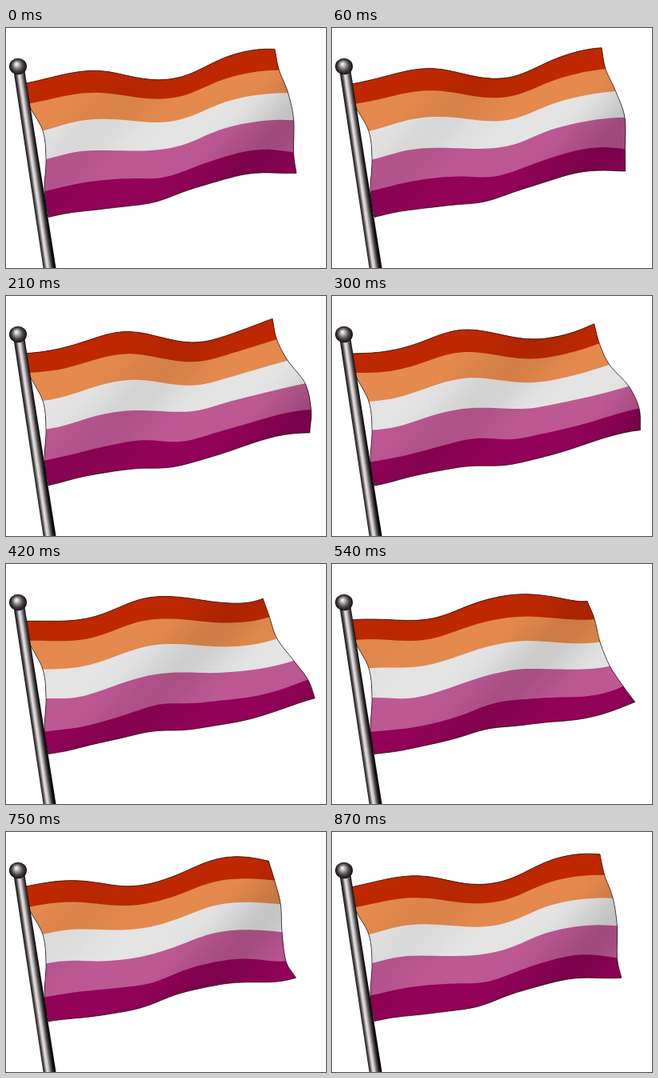
Write an HTML page with a canvas that moves like this. It is 400x300 px and loops after 900 ms.

```html
<!DOCTYPE html>
<html lang="en">
<head>
<meta charset="utf-8">
<title>Waving flag</title>
<style>
  html, body { margin: 0; width: 100%; height: 100%; overflow: hidden; background: #fff; }
  canvas { display: block; }
</style>
</head>
<body>
<canvas id="stage" width="400" height="300"></canvas>
<script>
const ctx = document.getElementById('stage').getContext('2d');
const LOOP = 900, STEP = 30;
const COLORS = ['#d52d00', '#ff9a56', '#ffffff', '#d362a4', '#a30262'];

// Seams from top to bottom. At six stations along x: mean height, swing,
// and the time of the wave crest. end: mean x, swing, time of the furthest reach.
const SEAMS = [
  { left: 25, mean: [70, 61.5, 55, 50.5, 41, 35.5], amp: [2, 9, 12.5, 11.5, 10, 11],
    crest: [-150, 75, 300, 520, 775, 985], end: [328, 9, 70] },
  { left: 28, mean: [95, 88, 81, 76.5, 67, 60], amp: [1, 8, 10.5, 9.5, 8, 9],
    crest: [-150, 80, 300, 520, 780, 985], end: [335, 7, 60] },
  { left: 46, mean: [130, 121.5, 112.5, 106.5, 96.5, 88], amp: [2, 7.5, 9, 8.5, 8, 9.5],
    crest: [-100, 75, 285, 525, 790, 1010], end: [345, 10, 100] },
  { left: 50, mean: [166, 159.5, 149.5, 140.5, 129, 119], amp: [2, 8, 8, 7, 6.5, 10],
    crest: [-50, 105, 300, 530, 820, 1070], end: [358, 16, 210] },
  { left: 48, mean: [207, 198, 187, 176.5, 164, 151], amp: [3, 6.5, 6, 6, 5.5, 10.5],
    crest: [50, 90, 250, 590, 840, 1190], end: [367, 17, 290] },
  { left: 53, mean: [237, 228.5, 218, 206, 193, 175], amp: [.5, 3.5, 4.5, 5.5, 6, 8],
    crest: [50, 230, 370, 690, 870, 1260], end: [374, 13, 370] }
];

const wave = ms => Math.cos(ms / LOOP * 2 * Math.PI);

// Catmull-Rom through evenly spaced values
function spline(v, u) {
  const last = v.length - 1;
  const i = Math.min(Math.floor(u), last - 1), f = u - i;
  const b = v[i], c = v[i + 1];
  const a = i > 0 ? v[i - 1] : 2 * b - c;
  const d = i + 2 <= last ? v[i + 2] : 2 * c - b;
  return b + f / 2 * (c - a + f * (2 * a - 5 * b + 4 * c - d + f * (3 * (b - c) + d - a)));
}

function sample(span, point) {
  const n = span * 10;
  return Array.from({ length: n + 1 }, (_, i) => point(i / 10));
}

function seamPoints(s, t) {
  const [mid, swing, peak] = s.end;
  const xs = [s.left, 100, 160, 220, 280, mid + swing * wave(t - peak)];
  return sample(5, u => [
    spline(xs, u),
    spline(s.mean, u) - spline(s.amp, u) * wave(t - spline(s.crest, u))
  ]);
}

function smooth(pts) {
  const xs = pts.map(p => p[0]), ys = pts.map(p => p[1]);
  return sample(pts.length - 1, u => [spline(xs, u), spline(ys, u)]);
}

function shape(pts) {
  const path = new Path2D();
  pts.forEach(([x, y]) => path.lineTo(x, y));
  path.closePath();
  return path;
}

// Slanted folds that travel with the wave and deepen to the lower right
function foldShade(t) {
  const g = ctx.createLinearGradient(0, 0, 365, 328);
  for (let i = 0; i <= 40; i++) {
    const q = i / 40 * 660;
    const peak = ((1 + wave(t - 630 - (q - 385) * 3.75)) / 2) ** 2;
    const alpha = .105 + .16 * (q / 500) ** 1.5 * peak;
    g.addColorStop(i / 40, `rgba(0,0,0,${alpha.toFixed(3)})`);
  }
  return g;
}

function drawFlag(t) {
  const seams = SEAMS.map(s => seamPoints(s, t));
  const hoist = smooth(seams.map(p => p[0]));
  const fly = smooth(seams.map(p => p[p.length - 1]));
  const outline = shape([...seams[0], ...fly, ...seams[5].slice().reverse(), ...hoist.reverse()]);

  ctx.save();
  ctx.clip(outline);
  for (let k = 4; k >= 0; k--) {
    const edge = seams[k + 1];
    ctx.fillStyle = COLORS[k];
    if (k === 4) ctx.fillRect(0, 0, 400, 300);
    else ctx.fill(shape([[0, 0], [0, edge[0][1]], ...edge, [400, edge[edge.length - 1][1]], [400, 0]]));
  }
  ctx.fillStyle = foldShade(t);
  ctx.fillRect(0, 0, 400, 300);
  ctx.restore();

  ctx.lineWidth = 1;
  ctx.strokeStyle = 'rgba(0,0,0,.65)';
  ctx.stroke(outline);
}

function withStops(g, ...stops) {
  stops.forEach(([at, color]) => g.addColorStop(at, color));
  return g;
}

function drawPole() {
  ctx.fillStyle = withStops(ctx.createLinearGradient(9.5, 56, 23.8, 53.9),
    [0, '#0c0a0b'], [.2, '#4c4648'], [.42, '#e6e2e3'], [.55, '#d0cbcc'], [.8, '#514b4d'], [1, '#0c0a0b']);
  ctx.fill(shape([[9.5, 54], [23.5, 54], [62.5, 300], [46.5, 300]]));

  ctx.fillStyle = withStops(ctx.createRadialGradient(13, 45, 1, 15, 48, 11),
    [0, '#f0eced'], [.25, '#a8a3a4'], [.6, '#4a4547'], [1, '#0e0c0d']);
  ctx.beginPath();
  ctx.ellipse(15, 48, 11, 10.3, 0, 0, 2 * Math.PI);
  ctx.fill();
}

function frame() {
  const t = Math.floor(performance.now() % LOOP / STEP) * STEP;
  ctx.fillStyle = '#fff';
  ctx.fillRect(0, 0, 400, 300);
  drawFlag(t);
  drawPole();
  requestAnimationFrame(frame);
}
frame();
</script>
</body>
</html>
```
